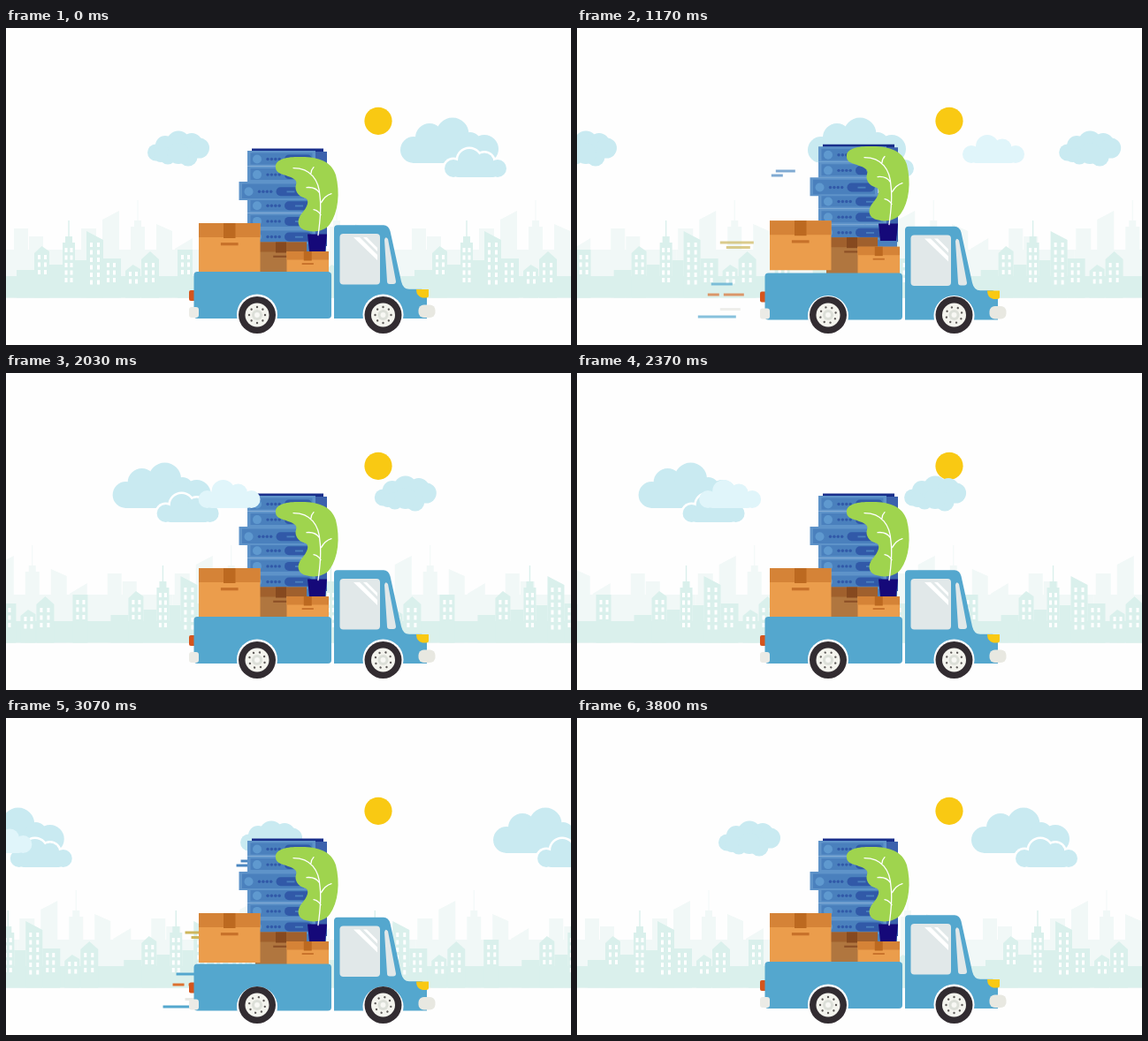
Animation, 639 px wide and 359 px high, one loop 3.83 s. Source, as an HTML page with a canvas:

```html
<!DOCTYPE html>
<html lang="en">
<head>
<meta charset="utf-8">
<title>Moving truck</title>
<style>
html, body { margin: 0; width: 100%; height: 100%; overflow: hidden; background: #fff; }
canvas { display: block; }
</style>
</head>
<body>
<canvas id="stage" width="639" height="359"></canvas>
<script>
const c = document.getElementById('stage').getContext('2d');
const LOOP = 3830, STEP = 40, STEPS = 95;

// ---- drawing helpers ----
function rect(x, y, w, h, color, r = 0) {
  c.fillStyle = color;
  c.beginPath();
  c.roundRect(x, y, w, h, r);
  c.fill();
}
function disc(x, y, r, color) {
  c.fillStyle = color;
  c.beginPath();
  c.arc(x, y, r, 0, Math.PI * 2);
  c.fill();
}
function shape(d, color) {
  c.fillStyle = color;
  c.fill(new Path2D(d));
}
function stroke(d, color, width) {
  c.strokeStyle = color;
  c.lineWidth = width;
  c.lineCap = 'round';
  c.stroke(new Path2D(d));
}
function at(x, y, draw) {
  c.save();
  c.translate(x, y);
  draw();
  c.restore();
}
function lerpKeys(keys, p) {
  if (p <= keys[0][0]) return keys[0][1];
  for (let i = 1; i < keys.length; i++) {
    const [p0, v0] = keys[i - 1], [p1, v1] = keys[i];
    if (p <= p1) return v0 + (v1 - v0) * (p - p0) / (p1 - p0);
  }
  return keys[keys.length - 1][1];
}

// ---- skyline ----
const GROUND = 305.5, FAR = '#f1f8f7', NEAR = '#daf0ec';

function building(x, w, left, right, color, peak) {
  const roof = peak ? `L${x + w / 2} ${peak}` : '';
  shape(`M${x} ${GROUND}V${left}${roof}L${x + w} ${right}V${GROUND}Z`, color);
}
function windows(x, y, rows, gap = 7) {
  for (let r = 0; r < rows; r++)
    for (let k = 0; k < 2; k++) rect(x + k * gap, y + r * 8.5, 3, 5, '#fff');
}
function farCluster() {
  building(-66, 225, 251, 251, FAR);
  building(-64, 17, 227, 227, FAR);
  building(-40, 19, 217, 207, FAR);
  building(-8, 16, 225, 225, FAR);
  building(-4, 8, 218, 218, FAR);
  rect(-.5, 195, 1, 25, FAR);
  building(21, 18, 222, 230, FAR);
  building(42, 20, 250, 238, FAR);
  building(85, 16, 227, 227, FAR);
  building(102, 16, 236, 236, FAR);
}
function nearCluster() {
  building(-59, 20, 274, 274, NEAR);
  building(-39, 17, 255, 253, NEAR, 247);
  windows(-35, 257, 3);
  building(-22, 15, 268, 268, NEAR);
  building(-7, 14, 243, 243, NEAR);
  rect(-4, 236, 8, 8, NEAR);
  rect(-.7, 218, 1.4, 20, NEAR);
  windows(-4.5, 249, 5, 6);
  building(7, 13, 263, 263, NEAR);
  building(20, 19, 230, 240, NEAR);
  windows(24, 243, 6, 8);
  building(39, 20, 261, 261, NEAR);
  windows(43, 266, 3);
  building(64, 17, 275, 273, NEAR, 268);
  windows(68, 276, 2);
  building(82, 20, 262, 262, NEAR, 253);
  windows(86, 266, 3, 8);
}
function house() {
  building(123, 17, 251, 251, NEAR);
  windows(127, 257, 3);
}
function skyline(n) {
  for (let x = -76; x < 1500; x += 225) at(x - 6.75 * n, 0, farCluster);
  rect(0, 281, 639, GROUND - 281, NEAR);
  const scroll = 640 * n / STEPS;
  for (let strip = 71 - 640; strip < 1400; strip += 640)
    for (let i = 0; i < 3; i++) at(strip + i * 225 - scroll, 0, () => {
      nearCluster();
      if (i < 2) house();
    });
}

// ---- clouds (x, y, radius) ----
const BLUE = '#c9eaf1', PALE = '#e0f5fa';
const puffs = (list, color, grow = 0) => list.forEach(([x, y, r]) => disc(x, y, r + grow, color));

function smallCloud(color, outline) {
  const list = [[10, 22, 10], [28, 13, 13], [45, 15, 10.5], [60, 22, 10]];
  if (outline) puffs(list, '#fff', 2.5);
  puffs(list, color);
  rect(10, 14, 50, 18, color, 5);
}
function bigCloud() {
  puffs([[15, 138, 15], [33, 124, 16], [59, 120, 18.5], [79, 130, 12], [95, 137, 16]], BLUE);
  rect(14, 128, 82, 25, BLUE);
  at(50, 137, () => smallCloud(BLUE, true));
}
function bumpyCloud() {
  puffs([[9.5, 141, 9.5], [20, 133, 11], [35, 130, 13.5], [50, 131, 12], [58.5, 136, 11.5],
    [23, 145, 9.5], [46, 146, 10.5], [35, 142, 12], [15, 144, 8]], BLUE);
}
function clouds(n) {
  const leave = -6.38 * n, enter = 5.836 * (STEPS - n);
  for (const dx of [leave, enter]) {
    at(446 + dx, 0, bigCloud);
    at(160 + dx, 0, bumpyCloud);
  }
}

// ---- speed lines ----
const PAINT = '#54a7ce';
const streaks = [
  [298.5, 162, 22, '#4a86c0'], [293.5, 167, 13, '#4a86c0'], [235.5, 243, 38, '#cdb65c'],
  [242.5, 248.5, 27, '#cdb65c'], [225.5, 290, 24, PAINT], [221.5, 302, 13, '#dc7030'],
  [239.5, 302, 23, '#dc7030'], [235.5, 318.5, 23, '#e8e8e4'], [210.5, 327, 43, PAINT]
];
function speedLines(phase) {
  if (phase < 0 || phase > 26) return;
  c.globalAlpha = Math.min(1, (26 - phase) / 13);
  for (const [x, y, w, color] of streaks) rect(x - .015 * phase ** 3, y - 1.5, w, 3, color);
  c.globalAlpha = 1;
}

// ---- cargo ----
function serverRow(x, y, h) {
  rect(x, y, 77, h, '#5e93c9');
  rect(x + 3.5, y + 2.5, 70, h - 4.6, '#4a80bd');
  disc(x + 11, y + h / 2 + .7, 5, '#5f99cf');
  for (let i = 0; i < 4; i++) disc(x + 23 + i * 4.4, y + h / 2 + .7, 1.7, '#3159a8');
  rect(x + 42, y + h / 2 - 4.3, 31, 10, '#3159a8', 5);
  rect(x + 54, y + h / 2, 9, 1.8, '#4a80bd');
}
function server() {
  rect(278, 136.5, 81, 4, '#192e8b');
  rect(346, 140, 17, 107, '#3c62ad');
  rect(276, 240, 86, 36, '#4a80bd');
  disc(280, 286, 2, '#150979');
  for (let i = 0; i < 6; i++)
    if (i !== 2) serverRow(273, 139 + i * 17.6, 17.6);
  serverRow(263.5, 174, 21);
}
function box(x, y, w, h, lid, tape, colors) {
  const [body, top, dark, grip] = colors, mid = x + w / 2;
  rect(x, y, w, h, body);
  rect(x, y, w, lid, top);
  rect(mid - tape / 2, y, tape, lid + 1, dark);
  rect(mid - tape * .73, y + lid * 1.38, tape * 1.46, lid * .2, grip);
}
const ORANGE = ['#eb9d4c', '#d58337', '#bc6920', '#c7712a'];
const BROWN = ['#b0763f', '#a0602d', '#86491f', '#8d5026'];

function plant() {
  shape('M341 233.5H363L361 253H343Z', '#150979');
  at(0, .6, () => {
    shape('M305 157C304 148 318 145 332 145.5C352 145 368 150 373 166C378 186 376 208 366 222' +
      'C360 230 348 231 341 229C329 227 328 217 335 209C341 202 344 194 338 192' +
      'C330 190 326 183 328 177C331 170 320 168 312 165C307 163 305 161 305 157Z', '#9fd44e');
    stroke('M325 158C345 158 354 172 355 190C357 205 355 220 353 234M345 164Q345 160 348 157' +
      'M340 180Q350 179 354.500 186M356.500 197Q361 189 368 187M348 205Q353 206 356 211', '#fff', 1.3);
  });
}
const BUMPS = [25, 60];
function lift(n, delay, height) {
  let y = 0;
  for (const start of BUMPS) {
    const p = (n - start - delay) / 12;
    if (p > 0 && p < 1) y -= height * Math.sin(Math.PI * p);
  }
  return y;
}
function cargo(n) {
  at(0, lift(n, 3, 18.3), server);
  const boxY = lift(n, 1.2, 8);
  at(0, boxY, () => box(282, 242.5, 58, 44, 11, 12, BROWN));
  at(0, lift(n, .6, 15.5), plant);
  at(0, boxY, () => box(317.5, 253, 47.5, 34, 9.5, 9, ORANGE));
  at(0, lift(n, 2.5, 7.3), () => box(218, 221, 69.5, 56, 16, 13.5, ORANGE));
}

// ---- truck ----
const WHEELS = [284, 426.5];
const sway = [[0, 0], [3, 2], [4, 1.5], [6, -1], [10, -2], [17, 2.5], [22, 0]];

function truckBody() {
  rect(207, 297, 8, 12, '#d5551d', 2);
  rect(212.5, 276, 155.5, 53, PAINT, 4);
  rect(207, 316, 11, 12, '#ebebe6', 3);
  shape('M371 329V227Q371 223.200 375 223.200H427Q432.500 223.200 434.500 230L447 287Q449 295.700 456 295.700' +
    'H470Q476 297 476 305V329Z', PAINT);
  rect(377.5, 233, 45.5, 57.5, '#e1e8e9', 4);
  shape('M393 237H400L420 257V263Z', '#fff');
  shape('M404 237H408L420 249V253Z', '#fff');
  shape('M428 240Q429 235 432 239L441 287Q441 290 438 290H434Q431 290 431 287Z', '#e1e8e9');
  shape('M464 296H478V303Q478 305.500 475 305.500H471Q464 304 464 296Z', '#f9c913');
  rect(466.5, 313.5, 19, 14.5, '#e8e8e1', 6);
  for (const x of WHEELS) disc(x, 324.5, 23, '#fefefe');
}
function wheel(x, n) {
  disc(x, 325, 21, '#322c31');
  disc(x, 325, 13.5, '#f4f4ee');
  at(x, 325, () => {
    c.rotate(n * Math.PI * 2 * 15 / STEPS);
    for (let i = 0; i < 8; i++) {
      c.rotate(Math.PI / 4);
      disc(9, 0, 1.2, '#5e5a58');
    }
  });
  disc(x, 325, 6, '#dcdfd8');
  disc(x, 325, 3, '#f8f8f4');
}
function truck(n) {
  cargo(n);
  const start = n < BUMPS[1] ? BUMPS[0] : BUMPS[1];
  at(0, lerpKeys(sway, n - start), truckBody);
  for (const x of WHEELS) wheel(x, n);
}

function render(time) {
  const n = Math.round(time % LOOP / STEP) % STEPS;
  c.fillStyle = '#fefefe';
  c.fillRect(0, 0, 639, 359);
  skyline(n);
  disc(421, 105.3, 15.6, '#f9c913');
  clouds(n);
  speedLines(n - 12);
  speedLines(n - 64);
  truck(n);
  at(724 - 9.93 * n, 121, () => smallCloud(PALE));
}

const begin = performance.now();
function tick() {
  render(performance.now() - begin);
  requestAnimationFrame(tick);
}
tick();
</script>
</body>
</html>
```
